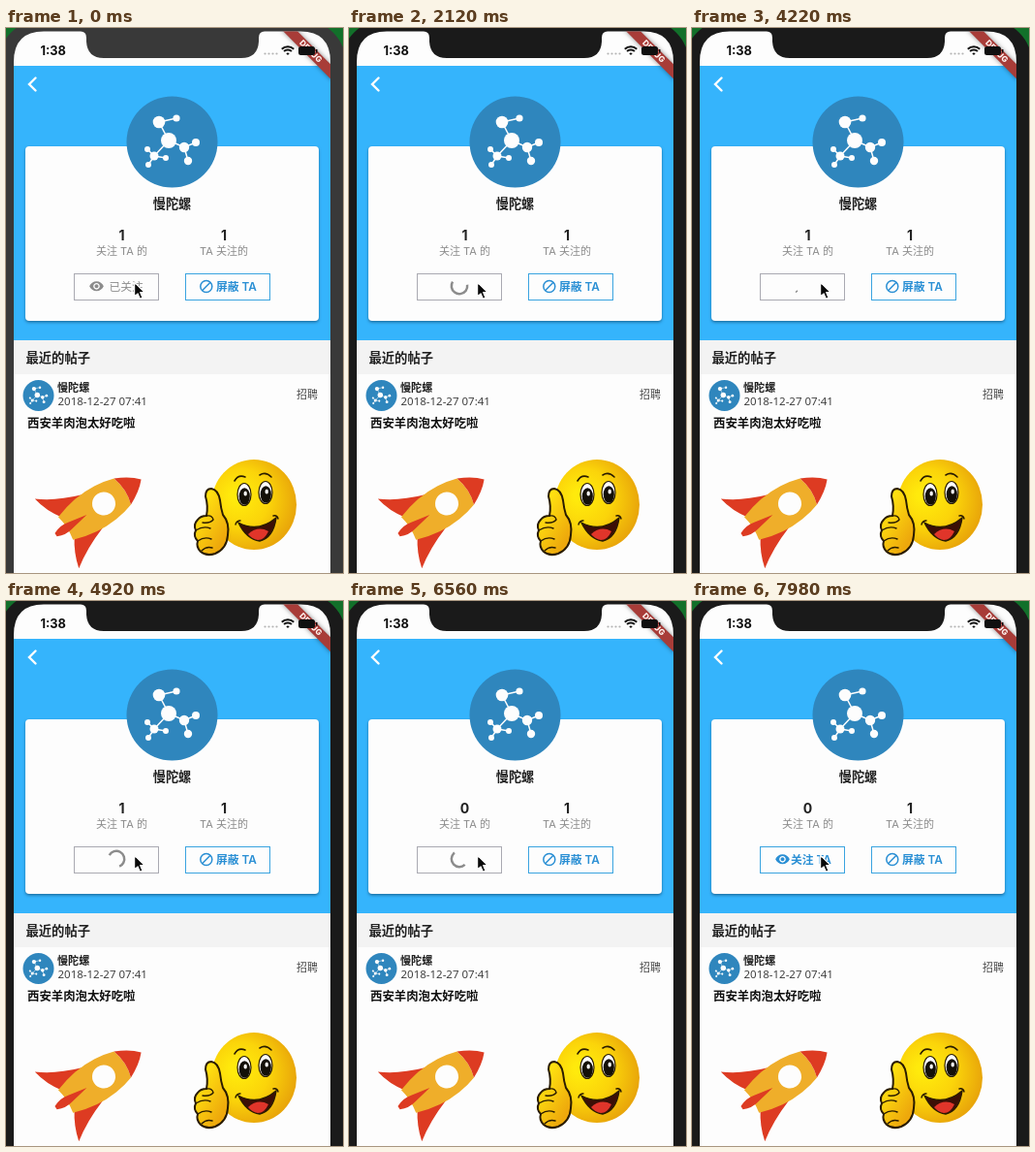
An HTML page with a canvas that plays this animation: 348x562 px, repeating every 8 s.

```html
<!DOCTYPE html>
<html lang="zh-CN">
<head>
<meta charset="utf-8">
<title>个人主页</title>
<style>
html, body { margin: 0; width: 100%; height: 100%; overflow: hidden; background: #1a1a1a; }
canvas { display: block; width: 348px; height: 562px; }
</style>
</head>
<body>
<canvas id="stage"></canvas>
<script>
const W = 348, H = 562, LOOP = 8000;
const SANS = '"Inter", "Noto Sans CJK SC", "Noto Sans CJK", sans-serif';
const DATE_FONT = '"Noto Sans", "Noto Sans CJK SC", sans-serif';
const PAPER = '#fdfdfd', BLUE = '#35b4fc', AVATAR = '#2f86bd', LINK = '#2a8fd4';
const GREY = '#8c8c8c', INK = '#202020', USER = '慢陀螺';
const EYE = new Path2D('M12 4.5C7 4.5 2.73 7.61 1 12c1.73 4.39 6 7.5 11 7.5s9.27-3.11 11-7.5c-1.73-4.39-6-7.5-11-7.5zM12 17c-2.76 0-5-2.24-5-5s2.24-5 5-5 5 2.24 5 5-2.24 5-5 5zm0-8c-1.66 0-3 1.34-3 3s1.34 3 3 3 3-1.34 3-3-1.34-3-3-3z');

// Times on the stage clock, in ms
const LOADING = 1400, UNFOLLOWED = 6480, LOADED = 6700;

const canvas = document.getElementById('stage');
const c = canvas.getContext('2d');
const dpr = window.devicePixelRatio || 1;
canvas.width = W * dpr;
canvas.height = H * dpr;

function text(str, x, y, size, color, weight = 400, align = 'left', family = SANS) {
  c.font = `${weight} ${size}px ${family}`;
  c.fillStyle = color;
  c.textAlign = align;
  c.textBaseline = 'middle';
  c.fillText(str, x, y);
}
function rect(x, y, w, h, color) {
  c.fillStyle = color;
  c.fillRect(x, y, w, h);
}
function round(x, y, w, h, r, color) {
  c.beginPath();
  c.roundRect(x, y, w, h, r);
  c.fillStyle = color;
  c.fill();
}
function paint(path, fill, stroke, lw = 1) {
  const p = path ? [new Path2D(path)] : [];
  if (fill) { c.fillStyle = fill; c.fill(...p); }
  if (stroke) { c.strokeStyle = stroke; c.lineWidth = lw; c.stroke(...p); }
}
function oval(x, y, rx, ry, fill, stroke, lw = 1) {
  c.beginPath();
  c.ellipse(x, y, rx, ry, 0, 0, Math.PI * 2);
  paint(null, fill, stroke, lw);
}
function at(x, y, scale, angle, draw) {
  c.save();
  c.translate(x, y);
  c.rotate(angle);
  c.scale(scale, scale);
  draw();
  c.restore();
}
function shade(x0, y0, x1, y1, from, to) {
  const g = c.createLinearGradient(x0, y0, x1, y1);
  g.addColorStop(0, from);
  g.addColorStop(1, to);
  return g;
}

function screenPath() {
  const top = 3.5;
  c.beginPath();
  c.moveTo(8, H);
  c.lineTo(8, 35);
  c.quadraticCurveTo(8, top, 39, top);
  c.lineTo(77, top);
  c.quadraticCurveTo(83, top, 83, 10);
  c.lineTo(83, 14);
  c.quadraticCurveTo(84, 31, 101, 31);
  c.lineTo(243, 31);
  c.quadraticCurveTo(260, 31, 261, 14);
  c.lineTo(261, 10);
  c.quadraticCurveTo(261, top, 267, top);
  c.lineTo(304, top);
  c.quadraticCurveTo(335, top, 335, 35);
  c.lineTo(335, H);
  c.closePath();
}

function avatar(x, y, r) {
  at(x, y, r / 47, 0, () => {
    oval(0, 0, 47, 47, AVATAR);
    paint('M-3.5-1.5L-13.5-20.5L4.5-24.5M-3.5-1.5L12.5 5.5L24.5.5M12.5 5.5L16.5 19.5M-3.5-1.5L-18.5 14.5L-25.5 7.5M-18.5 14.5L-24.5 23.5M-18.5 14.5L-6.5 16.5', null, PAPER, 1.5);
    [[-3.5, -1.5, 8], [-13.5, -20.5, 6.3], [4.5, -24.5, 3.6], [12.5, 5.5, 5.2], [24.5, .5, 4],
     [16.5, 19.5, 4.2], [-18.5, 14.5, 4.5], [-25.5, 7.5, 3], [-24.5, 23.5, 3], [-6.5, 16.5, 3]]
      .forEach(([nx, ny, nr]) => oval(nx, ny, nr, nr, PAPER));
  });
}

function statusBar() {
  text('1:38', 35.5, 24, 12.8, '#101010', 700);
  for (let i = 0; i < 4; i++) oval(267.5 + i * 4, 26.5, 1.1, 1.1, '#b4b4b4');
  for (const r of [2.4, 5.6, 8.8]) {
    c.beginPath();
    c.arc(291, 28, r, -Math.PI * .75, -Math.PI * .25);
    if (r < 3) { c.lineTo(291, 28); paint(null, '#101010'); }
    else paint(null, null, '#101010', 2);
  }
  round(302, 19, 17, 9, 2.5, '#101010');
  rect(320, 22, 1.5, 3.5, '#101010');
}

function banner() {
  at(335.5, 3, 1, Math.PI / 4, () => {
    c.shadowColor = 'rgba(0,0,0,.45)';
    c.shadowBlur = 5 * dpr;
    rect(-36, 24.6, 72, 10.5, '#a83c38');
    c.shadowColor = 'transparent';
    text('DEBUG', 0, 29.9, 8.3, '#fff4f0', 800, 'center');
  });
}

function rocket() {
  at(101, 490.5, 1, -.576, () => {
    const red = '#dd3b22';
    paint('M-14-20Q-40-29-57-43Q-54-26-44-12ZM-14 20Q-40 29-58 42Q-54 26-44 12Z', red);
    paint('M-47-14Q-22-23 2-20.5Q14-19 23-16Q28 0 23 16Q14 19 2 20.5Q-22 23-47 14Q-44 0-47-14Z', '#efae2a');
    paint('M23-16Q38-9 46 0Q38 9 23 16Q28 0 23-16Z', red);
    paint('M-59-2Q-50-6-42-4L-21 0L-42 4Q-50 6-59 2Z', red);
    oval(0, 0, 12, 12, PAPER);
  });
}

function smiley() {
  const line = '#2a1c00';
  const face = c.createRadialGradient(238, 482, 6, 246, 488, 60);
  face.addColorStop(0, '#ffea0c');
  face.addColorStop(.45, '#fbd40a');
  face.addColorStop(1, '#e59c0a');
  oval(256, 491.5, 44, 46.5, face);
  for (const [x, y] of [[246, 481], [268, 479]]) {
    oval(x, y, 7, 11.5, PAPER, line, 1.2);
    oval(x + .3, y + 2, 5.6, 8.8, '#141008');
    oval(x + 1.2, y - 1, 1.7, 2.6, PAPER);
  }
  c.lineCap = 'round';
  paint('M236 467Q240 460 247 463M262 461Q268 457 274 463', null, line, 1.6);
  paint('M240 510Q260 521 279 505Q276 526 262 529Q248 527 240 510Z', '#3c0f06', line, 1.4);
  paint('M250 522Q260 513 271 519Q267 528 260 528Q254 527 250 522Z', '#e0352a');
  paint('M237 512Q238 508 242 508M276 503Q280 502 281 506', null, line, 1.4);
  const skin = shade(198, 500, 230, 520, '#ffe010', '#eda70c');
  paint('M207 503Q209 493 206 483Q206 475 212 475Q219 476 221 487Q222 496 224 502Q231 510 229 523Q228 537 216 542Q207 545 201 540Q196 535 198 529Q193 524 196 518Q193 512 198 507Q201 503 207 503Z', skin, line, 2);
  paint('M196 518Q204 513 211 516M198 529Q205 524 212 527M202 539Q207 534 213 536M207 503Q213 502 214 507Q211 511 203 510', null, line, 1.4);
  c.lineCap = 'butt';
}

// Ease with control points (.4, 0) and (.2, 1)
function ease(x) {
  x = Math.min(1, Math.max(0, x));
  let lo = 0, hi = 1, s = .5;
  for (let i = 0; i < 20; i++) {
    s = (lo + hi) / 2;
    const bx = 1.2 * (1 - s) ** 2 * s + .6 * (1 - s) * s * s + s ** 3;
    if (bx < x) lo = s; else hi = s;
  }
  return 3 * (1 - s) * s * s + s ** 3;
}

// A 60 Hz recording, played with holds of 20, 100 and 20 ms
function seconds(t) {
  const m = t % 140;
  return (Math.floor(t / 140) * 3 + (m >= 20) + (m >= 120)) / 60;
}

// One turn a second; it stalls while the page rebuilds
function spinner(t) {
  const turns = Math.min(seconds(t) - seconds(LOADING), 1.64);
  const step = Math.floor(turns), p = turns - step;
  const head = ease(p * 2), tail = ease(p * 2 - 1);
  const start = Math.PI * (-.5 + tail * 1.5 + p * 1.7 - step * .8);
  c.beginPath();
  c.arc(114, 266, 8.2, start, start + Math.max((head - tail) * 1.5 * Math.PI, .18));
  paint(null, null, GREY, 2.5);
}

function outline(x, w, color) {
  c.strokeStyle = color;
  c.lineWidth = 1;
  c.strokeRect(x + .5, 253.5, w, 27);
}
function followButton(t) {
  const followed = t < LOADED;
  outline(70, 87, followed ? '#aaaab2' : '#3aa4e0');
  if (t >= LOADING && followed) return spinner(t);
  const color = followed ? GREY : LINK;
  at(85.5, 258.3, 16 / 24, 0, () => {
    c.fillStyle = color;
    c.fill(EYE);
  });
  text(followed ? '已关注' : '关注 TA', followed ? 106.5 : 102, 267, 11.8, color, followed ? 500 : 600);
}
function blockButton() {
  outline(185, 87, '#3aa4e0');
  oval(206.8, 266.5, 6, 6, null, LINK, 1.5);
  paint('M211 262.3L202.6 270.7', null, LINK, 1.5);
  text('屏蔽 TA', 217, 267, 11.8, LINK, 600);
}

function cursor() {
  at(132.8, 262.5, 1, 0, () => {
    c.lineJoin = 'round';
    paint('M0 0V14.2L3.3 11.2L5.7 16.8L8.2 15.7L5.8 10.3H10.2Z', '#080808', PAPER, 1.4);
    paint('M.6 1.4V12.8L3.5 10.2L6 15.8L7.2 15.2L4.8 9.6H8.8Z', '#080808');
  });
}

function profile(t) {
  rect(8, 39, 327, 283, BLUE);
  c.lineCap = 'round';
  paint('M30.5 51.5L24 58L30.5 64.5', null, PAPER, 2.4);
  c.lineCap = 'butt';
  c.save();
  c.shadowColor = 'rgba(0,40,70,.5)';
  c.shadowBlur = 3 * dpr;
  c.shadowOffsetY = 1.5 * dpr;
  round(20, 122, 303, 180, 4, PAPER);
  c.restore();
  avatar(171.5, 117.5, 47);
  text(USER, 171.5, 182.5, 13.2, INK, 600, 'center');
  text(t < UNFOLLOWED ? '1' : '0', 119.5, 215, 14, INK, 700, 'center');
  text('1', 225, 215, 14, INK, 700, 'center');
  text('关注 TA 的', 119.5, 230.5, 11, GREY, 400, 'center');
  text('TA 关注的', 225, 230.5, 11, GREY, 400, 'center');
  followButton(t);
  blockButton();
}

function posts() {
  rect(8, 322, 327, 35, '#f3f3f3');
  text('最近的帖子', 20.5, 340.5, 13.3, INK, 600);
  avatar(33.5, 379, 16);
  text(USER, 53, 371.5, 11.1, INK, 600);
  text('2018-12-27 07:41', 53.5, 386, 11.5, '#404040', 400, 'left', DATE_FONT);
  text('招聘', 300, 378.5, 11, '#484848');
  text('西安羊肉泡太好吃啦', 22, 408, 12.4, '#101010', 600);
  rocket();
  smiley();
}

function draw(t) {
  c.setTransform(dpr, 0, 0, dpr, 0, 0);
  rect(0, 0, W, H, '#12702a');
  round(-8, -8, 359, 640, 44, t < 840 ? '#393939' : '#1a1a1a');
  c.save();
  screenPath();
  c.clip();
  rect(0, 0, W, H, PAPER);
  profile(t);
  posts();
  banner();
  statusBar();
  c.restore();
  cursor();
}

const begin = performance.now();
function tick() {
  draw((performance.now() - begin) % LOOP);
  requestAnimationFrame(tick);
}
tick();
</script>
</body>
</html>
```
